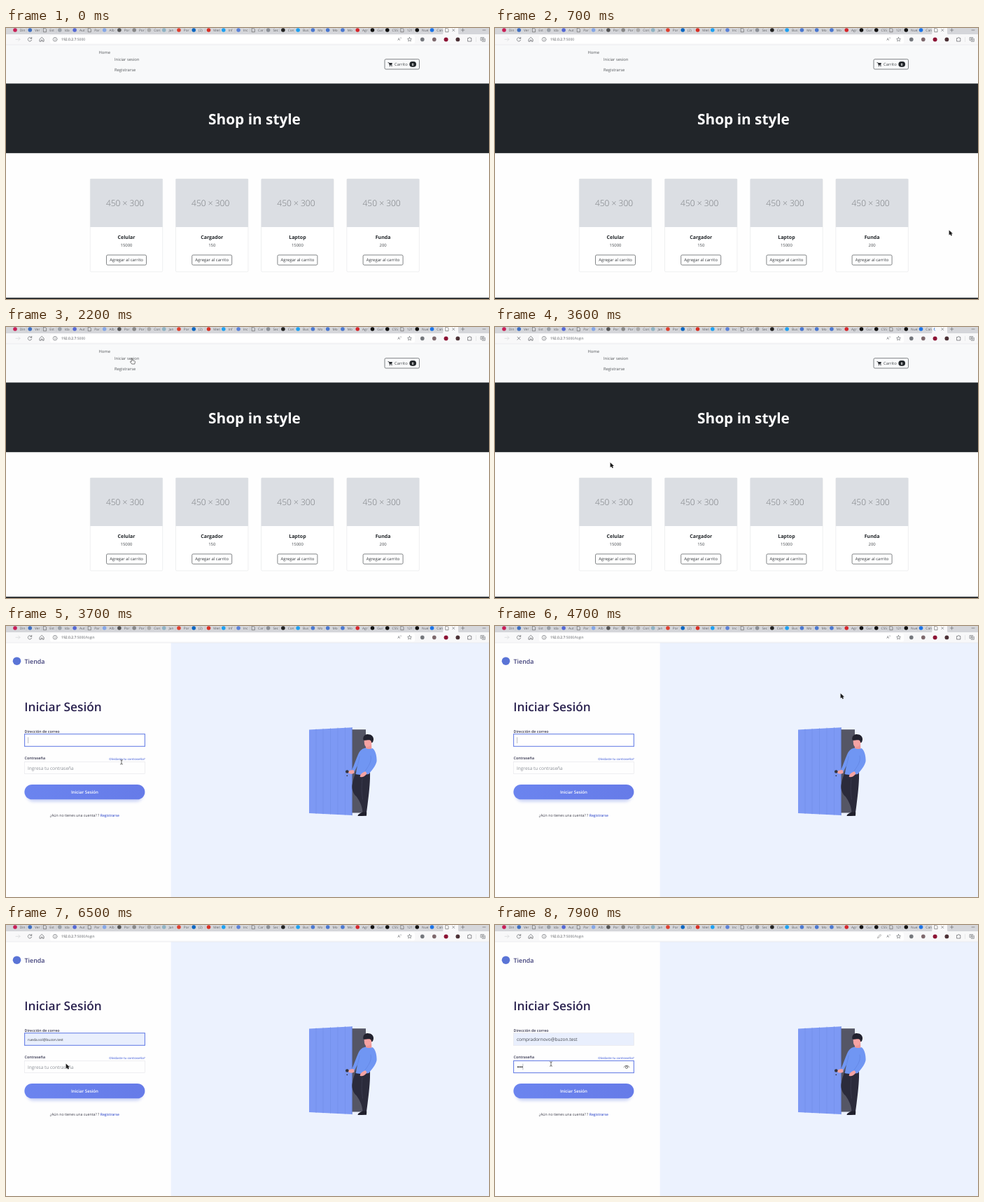
Recreate the animation shown at these times as an HTML page. Size 690 by 388 pixels, loop 8 s.

```html
<!DOCTYPE html>
<html lang="es">
<head>
<meta charset="utf-8">
<title>Tienda</title>
<style>
html, body { margin: 0; width: 100%; height: 100%; overflow: hidden; background: #fff; }
svg { display: block; width: 690px; height: 388px; }
text { font-family: "Open Sans", "Noto Sans", sans-serif; text-rendering: geometricPrecision; white-space: pre; }
</style>
</head>
<body>
<svg id="stage" viewBox="0 0 690 388">
  <defs>
    <linearGradient id="btn"><stop stop-color="#6b84ef"/><stop offset="1" stop-color="#667be8"/></linearGradient>
    <filter id="blur" x="-10%" y="-50%" width="120%" height="200%"><feGaussianBlur stdDeviation="2.2"/></filter>
  </defs>
  <g id="shop"></g>
  <g id="login"></g>
  <g id="chrome"></g>
  <g id="live"></g>
</svg>
<script>
const LOOP = 8000, STEP = 100;
const CLICK = 3200, LOADED = 3700, PREVIEW = 6300, FILLED = 7000, PASSWORD = 7600;
const INK = '#212529', BLUE = '#6a82e6';
const $ = id => document.getElementById(id);

const rect = (x, y, w, h, fill, more = '') =>
  `<rect x="${x}" y="${y}" width="${w}" height="${h}" fill="${fill}" ${more}/>`;
const disc = (x, y, r, fill) => `<circle cx="${x}" cy="${y}" r="${r}" fill="${fill}"/>`;
const text = (x, y, size, str, fill, more = '') =>
  `<text x="${x}" y="${y}" font-size="${size}" fill="${fill}" ${more}>${str}</text>`;
const fill = (d, color, more = '') => `<path d="${d}" fill="${color}" ${more}/>`;
const line = (d, color, width = 0.7, more = '') =>
  `<path d="${d}" fill="none" stroke="${color}" stroke-width="${width}" stroke-linecap="round" stroke-linejoin="round" ${more}/>`;
const MID = ' text-anchor="middle"', BOLD = ' font-weight="700"', SEMI = ' font-weight="600"';

function drawShop() {
  const products = [['Celular', 15000], ['Cargador', 150], ['Laptop', 15000], ['Funda', 200]];
  const card = ([name, price], i) => {
    const x = 120.3 + i * 122.2, mid = x + 51.7;
    return rect(x, 216, 103.4, 133, '#fff', 'stroke="#e3e4e6" stroke-width=".6" rx="1.5"') +
      rect(x, 216, 103.4, 69, '#dbdee3') +
      text(mid - 2, 255, 12, '450 × 300', '#7b7e82', MID + ' font-weight="300"') +
      text(mid, 301.8, 7, name, INK, MID + BOLD) +
      text(mid, 313.4, 5.9, price, '#45494d', MID) +
      rect(mid - 28.5, 325, 57, 14.3, '#fff', 'stroke="#4d5154" stroke-width=".7" rx="1.8"') +
      text(mid, 334.4, 5.95, 'Agregar al carrito', '#34383c', MID);
  };
  return rect(0, 24, 690, 364, '#fefefe') +
    rect(0, 24, 690, 56, '#f8f9fa') +
    text(132.4, 37.2, 5.85, 'Home', '#55585b') +
    text(155, 46.6, 5.8, 'Iniciar sesion', '#55585b') +
    text(155, 62, 5.8, 'Registrarse', '#55585b') +
    rect(541, 44.7, 49.5, 14.3, '#f8f9fa', 'stroke="#4d5154" stroke-width=".7" rx="1.8"') +
    line('M545.9 49.6h1.2l.9 3.4h3.1', INK) +
    fill('M547.2 50.1h4.7l-.8 2.7h-3.1z', INK) + disc(548.3, 54.3, 0.7, INK) + disc(551, 54.3, 0.7, INK) +
    text(555, 54.1, 5.8, 'Carrito', '#45494d') +
    rect(576.4, 48, 9.6, 7.7, INK, 'rx="3.8"') +
    text(581.2, 53.7, 4.8, '0', '#fff', MID + BOLD) +
    rect(0, 79.5, 690, 99.7, INK) +
    text(355, 138, 20.8, 'Shop in style', '#fff', MID + BOLD) +
    products.map(card).join('') +
    rect(0, 386.2, 690, 2, INK);
}

function drawDoor() {
  const skin = '#f5a3a3', shirt = '#7096f3', dark = '#2b2b3b';
  const planks = [443, 453, 463.5, 474, 484.5]
    .map(x => line(`M${x} ${148.4 - (x - 433) * 0.06}V${268.2 + (x - 433) * 0.04}`, '#6f8be4', 0.5)).join('');
  return rect(493, 148.2, 21, 119.3, '#555665') +
    fill('M433 148.6L494.5 145.2V271L433 268z', '#7d99f4') + planks +
    line('M494.3 145.5V270.8', '#6279cc', 0.6) +
    // trousers and shoes
    fill('M500 208L520 209.5C520.5 225 518 245 515 267H509.5C509 258 505 250 500.5 244C496 240 493.8 234 494.5 228C495.3 221 498 214 500 208z', dark) +
    line('M509 219C508 228 507.5 236 509.5 248', '#44445a', 0.5) +
    fill('M502.5 271.5C503 269 507 268 509 266.5L515.3 266.8L515 271.8L503 272z', '#1f1f2c') +
    // head
    fill('M514 168L522 168L522.5 177C519 179 516 178 514 175z', '#ee9797') +
    fill('M511.8 161C511.5 168 512 173 515.5 173.2C520 173 523.5 169 523.5 162z', skin) +
    fill('M510.4 163C509.5 157 514 154.6 518 155.2C524 155.5 526.5 161 524.3 165.5C523.5 167.4 522 167.6 521.8 165.5C521.6 163.5 519 163 517 163.3C514.5 163.6 512 164.4 510.4 163z', '#22222f') +
    // shirt and hands
    fill('M513.5 174.5C517 177 521 176 523.5 175C528 178 530 187 529.5 194C528 201 522 207 518.5 212C512 213.5 504 213.5 499.5 212C500.5 208 501 205 502 200C500 204 498.5 207 497 210L493.5 207.5C497 200 500 191 503 184C505.5 178 509 175.5 513.5 174.5z', shirt) +
    line('M521 186C522 192 521 197 513 207.5M502 200C503.5 195 504.5 191 505 187', '#5b7cd8', 0.5) +
    fill('M497.2 206.5C493 205.6 490 207 488.5 209.2C490 212 494.5 212.5 497.5 210.5z', skin) +
    fill('M513.5 208.3C509.5 209.5 505.5 212.5 505.8 216C509 217 513 215.5 515.5 211z', skin) +
    disc(487.3, 208.5, 2.3, '#34343f') + disc(487.3, 214.3, 0.9, '#34343f');
}

function drawLogin() {
  return rect(0, 24, 236, 364, '#fefefe') + rect(235.7, 24, 455, 364, '#ecf2fe') +
    disc(15.5, 50.2, 5.8, '#5a74d6') +
    text(26.6, 54, 8.9, 'Tienda', '#3d3d78', SEMI) +
    text(26.2, 122.4, 17.3, 'Iniciar Sesión', '#2b2350', SEMI) +
    text(26.5, 153.2, 5.35, 'Dirección de correo', '#33334d', SEMI) +
    text(26.5, 191.4, 5.35, 'Contraseña', '#33334d', SEMI) +
    text(198.6, 191.9, 4.3, 'Olvidaste tu contraseña?', '#5a72de', 'text-anchor="end"' + SEMI) +
    rect(29, 230.5, 167, 21, BLUE, 'rx="10.5" opacity=".35" filter="url(#blur)"') +
    rect(26.4, 226.9, 172, 21.4, 'url(#btn)', 'rx="10.7"') +
    text(112.4, 240.1, 6.1, 'Iniciar Sesión', '#fff', MID + SEMI) +
    text(62.8, 273, 5.25, `¿Aún no tienes una cuenta? ? <tspan font-size="5" fill="#4259cf"${SEMI}>Registrarse</tspan>`, '#3a3a48') +
    drawDoor();
}

// "-" stands for a blank page icon
const TABS = `Din #c91e55,Ver #3f6fc0,Est -,Ida #9aa0a8,Aut #5468d4,Par -,Alb #86a7e6,Por #555,Por #888,
Con #aaa,Jan #8fb3c4,Por #e0402f,(2) #0a66c2,Men #d93025,Inf #1da1f2,Inc #5b82d8,Car -,Sec #8b8f96,Con #222,
Bus #1da1f2,Mo #4a78d0,Mo #4a78d0,Mo #4a78d0,Agr #d6262b,Gui #111,C55 #111,121 -,Nue #111,Can #1a73e8`
  .split(',').map(s => s.trim().split(' '));

const page = (x, y) => line(`M${x - 1.8} ${y - 2.7}h2.4l1.4 1.4v4h-3.8z`, '#555', 0.6);

function drawChrome() {
  const grey = '#5c5f63';
  const tab = ([label, color], i) => {
    const x = 13 + i * 21.27;
    return (color === '-' ? page(x, 3) : disc(x, 3, 2.8, color)) +
      text(x + 6.8, 5, 4.8, label, '#5c5e63') +
      line(`M${x + 16.2} .5V6`, '#b4b6bb', 0.4);
  };
  return rect(0, 0, 690, 9, '#d5d6da') + TABS.map(tab).join('') +
    fill('M623 9.5Q624.5 9 624.5 7V0H646V7Q646 9 647.5 9.5z', '#f8f8f9') +
    line('M637.8 1.6l3 3m0-3l-3 3M652.6.8v4.4m-2.2-2.2h4.4M681 3h4', grey, 0.6) +
    rect(0, 9, 690, 15, '#f8f8f9') + rect(63, 10.8, 521, 11.4, '#fff', 'rx="2"') +
    line('M0 24H690', '#e4e5e7', 0.6) +
    line('M14 16.3h6m-2.3-2.3l2.3 2.3l-2.3 2.3', '#d4d6d9') +
    line('M48.3 16l2.9-2.7l2.9 2.7v3.2h-2v-2h-1.8v2h-2z', grey) +
    line('M73 16.3a2.9 2.9 0 1 1-5.8 0a2.9 2.9 0 1 1 5.8 0M70.1 16v1.6M70.1 14.7v.1', grey, 0.6) +
    text(559.6, 18.3, 5.4, 'A', grey) + line('M564 13.4q1 .8 0 1.8', grey, 0.5) +
    line('M576.5 13.3l.9 2l2 .2l-1.5 1.4l.5 2l-1.9-1l-1.9 1l.5-2l-1.5-1.4l2-.2z', grey, 0.6) +
    disc(594.8, 16.4, 2.8, '#74777c') + disc(611.8, 16.4, 2.8, '#7d686c') +
    disc(628.6, 16.4, 3, '#8c1233') + disc(645.4, 16.4, 2.9, '#4b3035') +
    line('M660 14.5h1.5a1 1 0 0 1 2 0h1.3v4.6h-4.8z', grey) +
    line('M671.5 13.5v6', '#d4d6d9', 0.5) +
    line('M678.5 13.6h4.2v4.2h-4.2zM680.3 19.3h4v-4M680.6 14.8v1.8m-.9-.9h1.8', grey, 0.6);
}

// [time, x, y] of the pointer
const PATH = [[700, 649, 290], [800, 534, 230], [900, 534, 230], [1000, 560, 205], [1200, 545, 120],
  [1500, 401, 46], [1800, 202, 60], [1900, 195, 58], [2200, 180, 45], [3100, 180, 45], [3600, 165, 194.5],
  [3900, 165, 195.5], [4300, 400, 125], [4700, 494, 97], [4800, 480, 104], [5600, 82, 185], [5800, 82, 185],
  [6000, 80, 163], [6100, 80, 163], [6400, 86, 199], [6600, 86, 199], [7000, 88, 217], [7400, 88, 216],
  [7600, 80, 199], [8000, 80, 199]];

function pointerAt(t) {
  const i = PATH.findIndex(p => p[0] > t);
  const [t0, x0, y0] = PATH[i - 1], [t1, x1, y1] = PATH[i];
  const k = (t - t0) / (t1 - t0);
  return [x0 + (x1 - x0) * k, y0 + (y1 - y0) * k];
}

function drawPointer(t) {
  if (t < PATH[0][0]) return '';
  const [x, y] = pointerAt(t);
  const inside = (l, r, top, bottom) => x > l && x < r && y > top && y < bottom;
  const listOpen = t >= PREVIEW - 200 && t < FILLED;
  const overField = t >= LOADED && !listOpen && (inside(27, 199, 154, 173) || inside(27, 199, 194, 212));
  const overLink = t < LOADED && inside(155, 190, 41, 50);
  const shape = overField ? line('M-1.5-3.2q1.5 0 1.5 1v4.4q0 1-1.5 1M1.5-3.2q-1.5 0-1.5 1M0 2.2q0 1 1.5 1', '#333', 0.7)
    : overLink ? fill('M-.8 0q.8-1 1.5 0v2.9l3 .7q.9.4.7 1.4l-.6 3h-4l-2.4-3.2q.4-1.2 1.8-.1z', '#fff', 'stroke="#222" stroke-width=".6"')
    : fill('M-.4-.4V6.6L1.3 5.2L2.5 7.6L3.9 6.9L2.9 4.6H5z', '#1c1c1c');
  return `<g transform="translate(${x} ${y})">${shape}</g>`;
}

function drawFields(t) {
  const box = (y, h, focused, bg) => rect(26.6, y, 171.8, h, bg,
    focused ? `stroke="${BLUE}" stroke-width="1.1"` : 'stroke="#e4e5ea" stroke-width=".6"');
  const caret = (x, y) => line(`M${x} ${y}v8`, '#777b88', 0.5);
  const onPassword = t >= PASSWORD, dots = Math.max(0, Math.round((t - PASSWORD) / 100));
  let out = box(154.7, 17.6, !onPassword, t >= PREVIEW ? '#e9effd' : '#fff');
  if (t >= FILLED) out += text(31, 166, 6.5, 'compradornovo@buzon.test', '#41454c');
  else if (t >= PREVIEW) out += text(31, 165.8, 5, 'rueda.sol@buzon.test', '#33363c');
  else if ((t - LOADED) % 1000 < 500) out += caret(31.6, 159.6);

  out += box(194.4, 17.2, onPassword, '#fefefe');
  if (!dots) out += text(31, 205.5, 6.5, 'Ingresa tu contraseña', '#8b8f96');
  else {
    for (let i = 0; i < dots; i++) out += disc(33 + i * 2.75, 203.3, 1, '#222');
    out += line('M184 203.5q4-5 8 0', '#444') + line('M189.6 203.8a1.6 1.6 0 1 1-3.2 0a1.6 1.6 0 1 1 3.2 0', '#444');
  }
  if (onPassword) out += caret(31.6 + dots * 2.75, 199);
  return out;
}

function drawLive(t) {
  const loading = t >= CLICK && t < LOADED;
  let out = text(79, 18.2, 5.05, `192.0.2.7<tspan fill="#5f6368">:5000${t >= CLICK ? '/login' : ''}</tspan>`, '#3a3c40');
  out += loading
    ? line('M32 14.2l4 4m0-4l-4 4', '#5c5f63') +
      line('M632.2 3a2.5 2.5 0 0 0-2.5-2.5', '#3b78d8', 0.9, `transform="rotate(${t * 0.36} 629.7 3)"`)
    : line('M36.4 15a2.7 2.7 0 1 0 .2 2.3M36.7 13.3v1.9h-1.9', '#5c5f63') + page(630, 3);
  if (t > PASSWORD) out += line('M546.7 18.4l.5-1.7l3.2-3.2l1.2 1.2l-3.2 3.2z', '#777', 0.6);
  if (t >= LOADED) out += drawFields(t);
  return out + drawPointer(t);
}

$('shop').innerHTML = drawShop();
$('login').innerHTML = drawLogin();
$('chrome').innerHTML = drawChrome();

const start = performance.now();
function frame() {
  const t = Math.floor((performance.now() - start) % LOOP / STEP) * STEP;
  $('shop').style.display = t < LOADED ? '' : 'none';
  $('login').style.display = t < LOADED ? 'none' : '';
  $('live').innerHTML = drawLive(t);
  requestAnimationFrame(frame);
}
frame();
</script>
</body>
</html>
```
